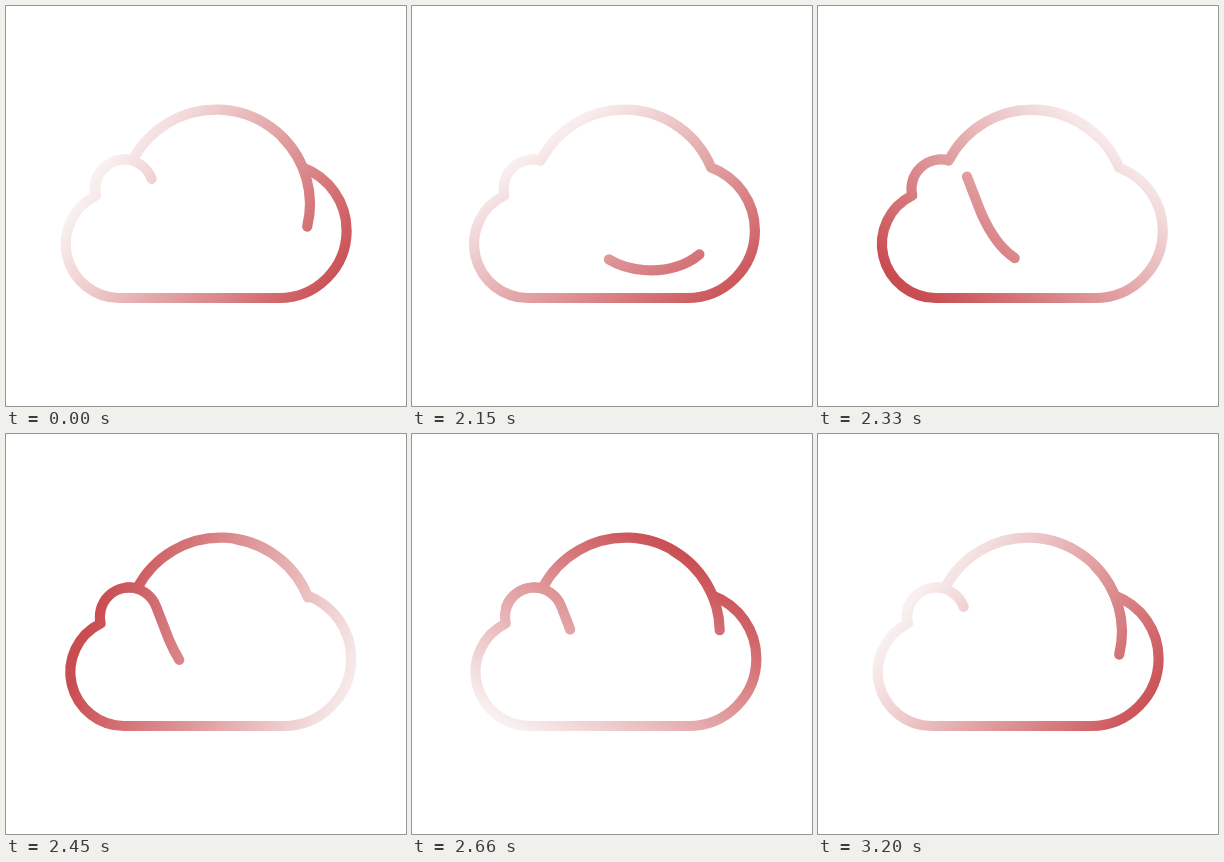
An HTML page that plays this animation: 400x400 px, repeating every 3.29 s.

```html
<!DOCTYPE html>
<html lang="en">
<head>
<meta charset="utf-8">
<title>Cloud</title>
<style>
  html, body { margin: 0; width: 100%; height: 100%; overflow: hidden; background: #fff; }
  svg { display: block; width: 100vw; height: 100vh; }
</style>
</head>
<body>
<svg viewBox="0 0 400 400">
  <defs>
    <linearGradient id="shade" gradientUnits="userSpaceOnUse">
      <stop offset="0" stop-color="#f9f0f0"/>
      <stop offset="1" stop-color="#c94c51"/>
    </linearGradient>
  </defs>
  <g id="cloud" fill="none" stroke="url(#shade)" stroke-width="10.2" stroke-linecap="round" stroke-linejoin="round">
    <path d="M90 189.5 A54 54 0 0 0 114.5 292 H273.2 A67.4 67.4 0 0 0 340.6 224.6
             A67.4 67.4 0 0 0 296.8 161.5
             A94 94 0 0 0 126.5 154.5 A29.5 29.5 0 0 0 90 189.5 Z"/>
    <path id="wisp" d="M210 104 A94 94 0 0 1 298.3 230.1 C291 250 265 267 229.3 264
             C195 261 175 244 158.5 206 L145.7 173
             A29.5 29.5 0 0 0 118 153.5 A29.5 29.5 0 0 0 88.7 186"/>
  </g>
</svg>
<script>
const LOOP = 3290, START = 2000, RUN = 1200, STEP = 30;
const DASH = 96, GAP = 225, TIP = 170;
const cloud = document.getElementById('cloud');
const wisp = document.getElementById('wisp');
const shade = document.getElementById('shade');
wisp.setAttribute('stroke-dasharray', `${DASH} ${GAP}`);

const bez = (a, b, u) => 3 * a * u * (1 - u) ** 2 + 3 * b * u * u * (1 - u) + u ** 3;

function turnEase(x) {
  let lo = 0, hi = 1;
  for (let i = 0; i < 24; i++) {
    const mid = (lo + hi) / 2;
    if (bez(.33, .4, mid) < x) lo = mid; else hi = mid;
  }
  return bez(0, 1, lo);
}

// Exponential glide that settles exactly at 1
function glide(ms) {
  const delay = 21, tau = 251, end = RUN - delay;
  const t = Math.max(0, ms - delay);
  return 1 - Math.exp(-t / tau) + Math.exp(-end / tau) * (t / end) ** 2;
}

function sway(ms) {
  const peak = 450;
  return 4.6 * (ms < peak
    ? Math.sin(Math.PI / 2 * ms / peak)
    : (1 + Math.cos(Math.PI * (ms - peak) / (RUN - peak))) / 2);
}

function draw(now) {
  const t = now % LOOP - START;
  const ms = Math.min(RUN, Math.max(0, Math.floor(t / STEP) * STEP));

  cloud.setAttribute('transform', `translate(${sway(ms)} 0)`);
  wisp.setAttribute('stroke-dashoffset', DASH - TIP - (DASH + GAP) * glide(ms));

  const angle = (35 + 360 * turnEase(ms / RUN)) * Math.PI / 180;
  const c = Math.cos(angle), s = Math.sin(angle);
  const half = Math.hypot(140 * c, 113 * s);
  const cx = 214, cy = 224;
  shade.setAttribute('x1', cx - half * c);
  shade.setAttribute('y1', cy - half * s);
  shade.setAttribute('x2', cx + half * c);
  shade.setAttribute('y2', cy + half * s);
}

function tick() {
  draw(performance.now());
  requestAnimationFrame(tick);
}
tick();
</script>
</body>
</html>
```
